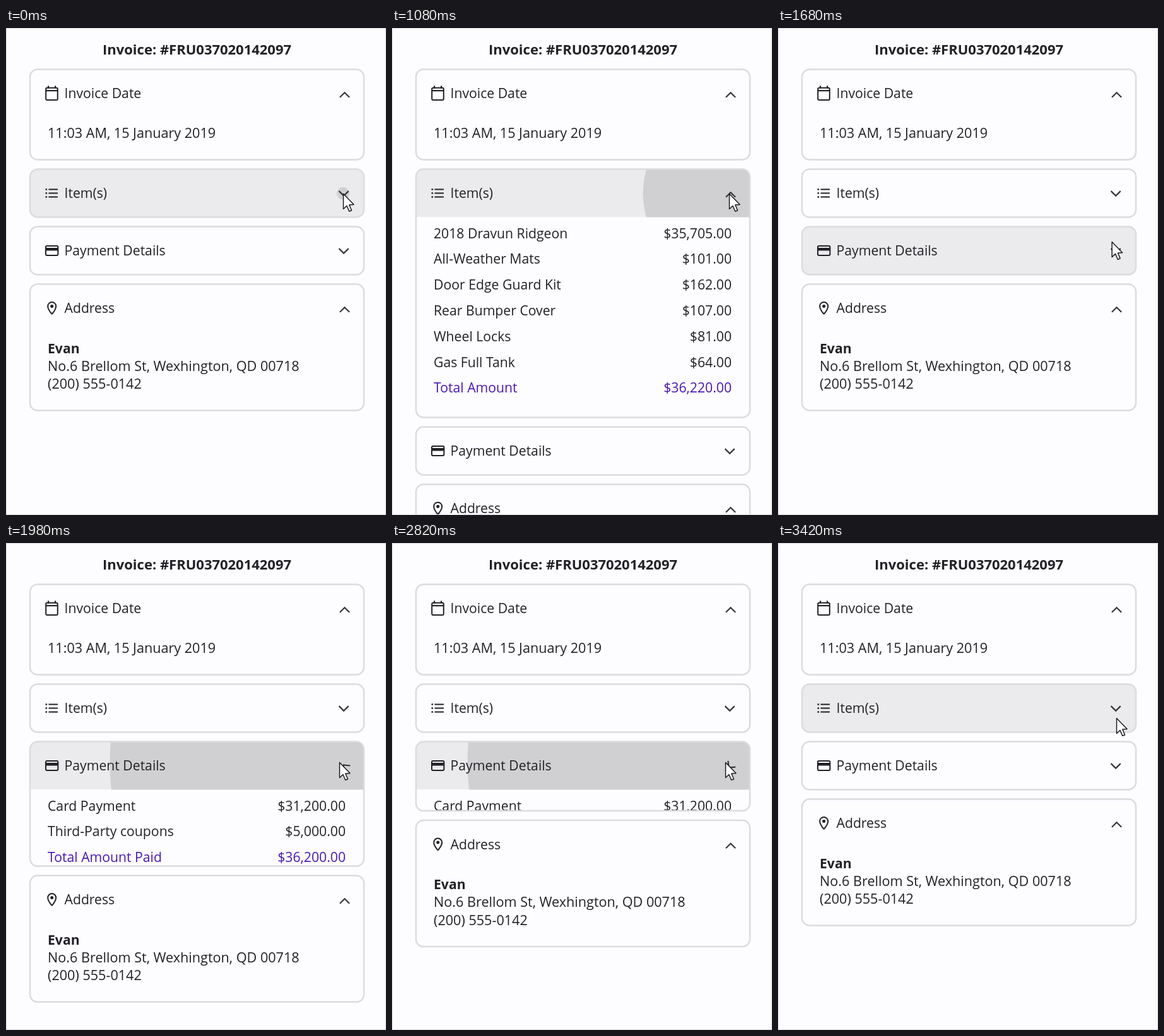
Animation of 602x771 px, one loop 3480 ms. Source, as an HTML page with a canvas:

```html
<!DOCTYPE html>
<html lang="en">
<head>
<meta charset="utf-8">
<title>Invoice</title>
<style>
  html, body { margin: 0; width: 100%; height: 100%; overflow: hidden; background: #fdfcfe; }
  canvas { display: block; }
</style>
</head>
<body>
<canvas id="stage" width="602" height="771"></canvas>
<script>
const ctx = document.getElementById('stage').getContext('2d');
const LOOP = 3480, STEP = 60, TOGGLE = 220;
const LEFT = 38, RIGHT = 567, HEADER = 76, GAP = 15;
const INK = '#222126', PURPLE = '#4a18b6', PAPER = '#fdfcfe', EDGE = '#dcdbdf';
const FAMILY = '"Open Sans", "Noto Sans", sans-serif';
const LABEL_FONT = '21.2px ' + FAMILY;
const DETAIL_FONT = '21.6px ' + FAMILY;
const NAME_FONT = 'bold 21.2px ' + FAMILY;
const TITLE_FONT = 'bold 22px ' + FAMILY;

const items = [
  ['2018 Dravun Ridgeon', '$35,705.00'],
  ['All-Weather Mats', '$101.00'],
  ['Door Edge Guard Kit', '$162.00'],
  ['Rear Bumper Cover', '$107.00'],
  ['Wheel Locks', '$81.00'],
  ['Gas Full Tank', '$64.00'],
  ['Total Amount', '$36,220.00']
];
const payments = [
  ['Card Payment', '$31,200.00'],
  ['Third-Party coupons', '$5,000.00'],
  ['Total Amount Paid', '$36,200.00']
];

// Pointer stops: time, x, y
const pointerPath = [
  [0, 534, 262], [1440, 534, 262], [1740, 528, 347],
  [3060, 528, 347], [3420, 536, 277], [LOOP, 534, 262]
];
const presses = [
  { time: 0, card: 'items' }, { time: 1001, card: 'items' },
  { time: 1759, card: 'payment' }, { time: 2571, card: 'payment' }
];

const clamp = v => Math.max(0, Math.min(1, v));
const openness = (t, on, off) => clamp((t - on) / TOGGLE) - clamp((t - off) / TOGGLE);

function pointerAt(t) {
  const i = pointerPath.findIndex(p => p[0] > t);
  const [t0, x0, y0] = pointerPath[i - 1], [t1, x1, y1] = pointerPath[i];
  const p = (t - t0) / (t1 - t0), k = p * p * (3 - 2 * p);
  return { x: x0 + (x1 - x0) * k, y: y0 + (y1 - y0) * k };
}

function text(str, x, y, { color = INK, align = 'left', font = LABEL_FONT } = {}) {
  ctx.font = font;
  ctx.fillStyle = color;
  ctx.textAlign = align;
  ctx.fillText(str, x, y);
}

function box(x, y, width, height) {
  ctx.beginPath();
  ctx.roundRect(x, y, width, height, 2);
  ctx.stroke();
}

// Icons are drawn around the vertical centre of a header
const icons = {
  calendar() {
    box(63.2, -8.8, 18.6, 19.2);
    ctx.fillRect(63, -5.4, 19, 2.2);
    ctx.fillRect(66, -12, 2.2, 4);
    ctx.fillRect(77, -12, 2.2, 4);
  },
  list() {
    for (const y of [-6, 0, 6]) {
      ctx.fillRect(62.5, y - 1.2, 2.6, 2.4);
      ctx.fillRect(67.5, y - 1, 14.5, 2);
    }
  },
  card() {
    box(63, -7.5, 19.4, 15);
    ctx.fillRect(63, -4.5, 19.4, 4.5);
  },
  pin() {
    ctx.beginPath();
    ctx.moveTo(72.7, 9.5);
    ctx.bezierCurveTo(68, 4, 66.2, 0, 66.2, -3);
    ctx.arc(72.7, -3, 6.5, Math.PI, 0);
    ctx.bezierCurveTo(79.2, 0, 77.4, 4, 72.7, 9.5);
    ctx.stroke();
    ctx.beginPath();
    ctx.arc(72.7, -3, 2.5, 0, 7);
    ctx.fill();
  }
};

function drawIcon(name, middle) {
  ctx.save();
  ctx.translate(0, middle);
  ctx.lineWidth = 2;
  ctx.strokeStyle = ctx.fillStyle = INK;
  icons[name]();
  ctx.restore();
}

function chevron(middle, open) {
  ctx.save();
  ctx.translate(535.8, middle + 1.4);
  ctx.rotate(Math.PI * open);
  ctx.beginPath();
  ctx.moveTo(-8.3, -4.8);
  ctx.lineTo(-0.7, 2.7);
  ctx.lineTo(6.9, -4.8);
  ctx.lineWidth = 2.2;
  ctx.strokeStyle = '#37363a';
  ctx.stroke();
  ctx.restore();
}

function ripple(t, name, x, y) {
  for (const press of presses) {
    const age = t - press.time;
    if (press.card !== name || age < 0) continue;
    ctx.globalAlpha = 1 - clamp((age - 306) / 70);
    ctx.fillStyle = '#d0cfd1';
    ctx.beginPath();
    ctx.arc(x, y, 10 + 1.6 * age, 0, 7);
    ctx.fill();
  }
  ctx.globalAlpha = 1;
}

function rows(list, top) {
  list.forEach(([label, price], i) => {
    const y = top + 109 + i * 40.8;
    const color = i === list.length - 1 ? PURPLE : INK;
    text(label, 66, y, { color });
    text(price, 538, y, { color, align: 'right' });
  });
}

function dateBody(top) {
  text('11:03 AM, 15 January 2019', 66, top + 108.5, { font: DETAIL_FONT });
}

function addressBody(top) {
  text('Evan', 66, top + 109, { font: NAME_FONT });
  text('No.6 Brellom St, Wexhington, QD 00718', 66, top + 137, { font: DETAIL_FONT });
  text('(200) 555-0142', 66, top + 165.5, { font: DETAIL_FONT });
}

const cards = [
  { name: 'date', label: 'Invoice Date', icon: 'calendar', full: 67, body: dateBody },
  { name: 'items', label: 'Item(s)', icon: 'list', full: 317, body: top => rows(items, top) },
  { name: 'payment', label: 'Payment Details', icon: 'card', full: 154, body: top => rows(payments, top) },
  { name: 'address', label: 'Address', icon: 'pin', full: 124, body: addressBody }
];

function drawCard(card, top, open, t, pointer) {
  const height = HEADER + card.full * open, middle = top + HEADER / 2;
  const outline = new Path2D();
  outline.roundRect(LEFT, top, RIGHT - LEFT, height, 12);

  ctx.save();
  ctx.clip(outline);
  if (open) card.body(top);
  ctx.beginPath();
  ctx.rect(LEFT, top, RIGHT - LEFT, HEADER);
  ctx.clip();
  if (pointer.y >= top && pointer.y <= top + HEADER) {
    ctx.fillStyle = '#ebeaec';
    ctx.fillRect(LEFT, top, RIGHT - LEFT, HEADER);
  }
  ripple(t, card.name, pointer.x, pointer.y);
  ctx.restore();

  ctx.strokeStyle = EDGE;
  ctx.lineWidth = 2.5;
  ctx.stroke(outline);

  drawIcon(card.icon, middle);
  text(card.label, 92.5, top + 45.5);
  chevron(middle, open);
  return top + height + GAP;
}

function drawPointer({ x, y }) {
  ctx.save();
  ctx.translate(x + 0.5, y + 0.5);
  ctx.beginPath();
  [[0, 0], [0, 24], [5.4, 19], [9.2, 27.8], [13, 26.2], [9.3, 17.5], [16.5, 17]]
    .forEach(([px, py]) => ctx.lineTo(px, py));
  ctx.closePath();
  ctx.fillStyle = '#fff';
  ctx.fill();
  ctx.lineWidth = 1.5;
  ctx.lineJoin = 'round';
  ctx.strokeStyle = '#1c1b1f';
  ctx.stroke();
  ctx.restore();
}

function draw(t) {
  const pointer = pointerAt(t);
  const open = {
    date: 1,
    items: openness(t, 90, 1085),
    payment: openness(t, 1807, 2648),
    address: 1
  };
  ctx.fillStyle = PAPER;
  ctx.fillRect(0, 0, 602, 771);
  text('Invoice: #FRU037020142097', 302.5, 41.5, { align: 'center', font: TITLE_FONT });

  let top = 65.5;
  for (const card of cards) top = drawCard(card, top, open[card.name], t, pointer);

  drawPointer(pointer);
  ctx.strokeStyle = '#d6d5d8';
  ctx.lineWidth = 1;
  ctx.strokeRect(0.5, 0.5, 601, 770);
}

let start;
function tick(now) {
  start ??= now;
  const t = (now - start) % LOOP;
  draw(Math.floor(t / STEP) * STEP);
  requestAnimationFrame(tick);
}
requestAnimationFrame(tick);
</script>
</body>
</html>
```
